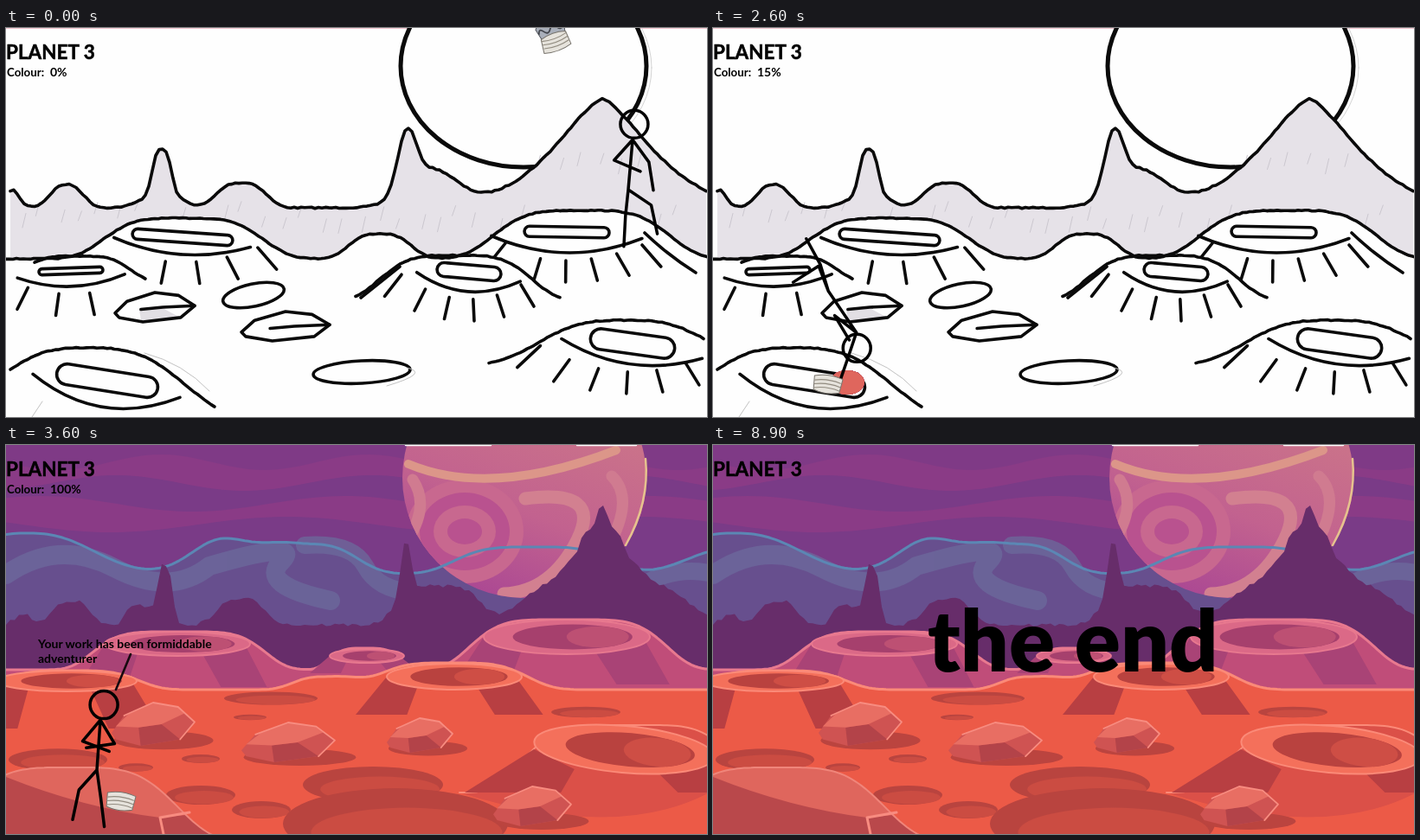
An HTML page that plays this animation: 810x450 px, repeating every 8950 ms.

```html
<!DOCTYPE html>
<html lang="en">
<head>
<meta charset="utf-8">
<title>Planet 3</title>
<style>
  html, body { margin: 0; width: 100%; height: 100%; overflow: hidden; background: #fff; }
  svg { display: block; width: 810px; height: 450px; }
  text { font-family: Lato, "Open Sans", sans-serif; font-weight: 700; font-size: 14px; white-space: pre; }
</style>
</head>
<body>
<svg id="stage" viewBox="0 0 810 450"></svg>
<script>
const LOOP = 8950, STEP = 50, INK = '#0a0a0a';

// ---------- drawing helpers ----------
let seed = 7;
const random = () => (seed = seed * 16807 % 2147483647) / 2147483647;
const jitter = size => (random() - .5) * size;
const range = (n, make) => Array.from({ length: n }, (_, i) => make(i)).join('');

const path = (d, fill, stroke = 'none', w = 0) =>
  `<path d="${d}" fill="${fill}" stroke="${stroke}" stroke-width="${w}"/>`;
const line = (d, color = INK, w = 3.6) => path(d, 'none', color, w);
const land = (d, color) => path(d + 'V450H0Z', color);
const oval = (x, y, rx, ry, fill, stroke = 'none', w = 0) =>
  `<ellipse cx="${x}" cy="${y}" rx="${rx}" ry="${ry}" fill="${fill}" stroke="${stroke}" stroke-width="${w}"/>`;
const turned = (angle, x, y, content) => `<g transform="rotate(${angle} ${x} ${y})">${content}</g>`;

// Skyline: a base height with bumps of [centre, height, width, steepness]
function profile(base, bumps, { from = 0, to = 810, rough = 0, step = 4 } = {}) {
  const points = [];
  for (let x = from; x <= to + step / 2; x += step) {
    const rise = bumps.reduce((sum, [c, h, w, p]) => sum + h * Math.exp(-((Math.abs(x - c) / w) ** p)), 0);
    points.push(`${x} ${(base - rise + jitter(rough)).toFixed(1)}`);
  }
  return 'M' + points.join('L');
}

// Every rock is one outline scaled to its place
const scaled = (shape, x, y, rx, ry) =>
  'M' + shape.map(([u, v]) => `${x + u * rx} ${y + v * ry}`).join('L');
const ROCK = [[-1, .4], [-.7, -.4], [0, -1], [.6, -.8], [1, -.1], [.65, .7], [-.3, 1], [-.9, .7]];
const ROCK_TOP = [[-.9, .1], [-.6, -.45], [0, -1], [.6, -.8], [.75, -.5], [.2, 0], [-.35, .15]];
const ROCK_FRONT = [[-.35, .15], [.2, 0], [.65, .7], [-.3, 1]];

// ---------- pencil drawing ----------
function sketchCrater({ x, y, rx, ry, tilt, rim, dip, marks = 0, left = 0, right = 0 }) {
  const top = y + 6;
  const mark = i => {
    const u = left + (right - left) * i / (marks - 1);
    const sx = x + u * rim, sy = top + dip * (1 - u * u) + 9;
    return line(`M${sx} ${sy}q${u * rim * .12} 12 ${u * rim * .25} 25`);
  };
  return turned(tilt, x, y,
    `<rect x="${x - rx}" y="${y - ry}" width="${rx * 2}" height="${ry * 2}" rx="${ry}" fill="none" stroke="${INK}" stroke-width="3.6"/>`
    + line(`M${x - rim} ${top}Q${x} ${top + dip * 2} ${x + rim} ${top}`)) + range(marks, mark);
}

function sketch() {
  const ridge = profile(208, [[8, 22, 10, 1.5], [70, 27, 24, 2.5], [180, 48, 13, 3], [180, 20, 28, 2], [272, 29, 34, 3],
    [463, 66, 15, 2], [492, 42, 40, 2], [689, 126, 80, 1.5]], { from: 5, rough: 1.5 });
  const ground = profile(267, [[205, 47, 100, 4], [432, 29, 42, 3], [665, 56, 110, 4]], { rough: 1 });
  const stroke = i => {
    const x = 20 + i * 23 + jitter(14), y = (x > 610 && x < 740 ? 150 : 212) + jitter(24);
    return `M${x} ${y}l-4 ${14 + jitter(8)}`;
  };
  const mound = (base, bump, from, to) => line(profile(base, [bump], { from, to, rough: 1 }));
  return `<rect width="810" height="450" fill="#fefefe"/><rect width="810" height="1" fill="#f4c6d0"/>`
    + oval(603, 46, 143, 117, 'none', '#d4d4d4', 1) + oval(598, 44, 142, 117, '#fefefe', INK, 5)
    + path(ridge + 'V275H5Z', '#e6e2e8') + line(range(34, stroke), '#cbc7cf', 1)
    + land(ground, '#fefefe') + line(ridge) + line(ground)
    + mound(295, [82, 31, 68, 4], 33, 161) + mound(316, [520, 53, 95, 4], 404, 638)
    + mound(392, [715, 54, 115, 3], 558, 806) + mound(460, [95, 90, 130, 3], 5, 241)
    + line('M738 237Q765 263 797 283M577 249L565 264M455 276L410 312')
    + [
      { x: 204, y: 242, rx: 58, ry: 6, tilt: 4, rim: 79, dip: 14, marks: 4, left: -.25, right: 1.1 },
      { x: 648, y: 236, rx: 49, ry: 6, tilt: 1, rim: 87, dip: 18, marks: 5, left: -.35, right: 1 },
      { x: 535, y: 282, rx: 37, ry: 8, tilt: 5, rim: 60, dip: 17, marks: 6, left: -1.3, right: 1 },
      { x: 75, y: 281, rx: 37, ry: 3.5, tilt: -2, rim: 62, dip: 12, marks: 3, left: -.8, right: .35 },
      { x: 724, y: 365, rx: 49, ry: 12, tilt: 8, rim: 82, dip: 18, marks: 6, left: -1.3, right: .75 },
      { x: 117, y: 408, rx: 59, ry: 12, tilt: 9, rim: 86, dip: 25 }
    ].map(sketchCrater).join('')
    + path(scaled(ROCK_FRONT, 170, 323, 46, 16), '#e2dfe4')
    + [[172, 323, 46, 17], [323, 345, 51, 17]].map(at =>
      line(scaled(ROCK, ...at) + 'Z') + line(scaled(ROCK_FRONT.slice(0, 2).concat([ROCK[4]]), ...at))).join('')
    + turned(-12, 286, 309, oval(286, 309, 36, 13, 'none', INK, 3.6))
    + turned(-3, 411, 398, oval(411, 398, 56, 13, 'none', INK, 3.6))
    + line('M463 393q28 6-23 21M42 432L30 450M160 376Q205 388 235 420', '#c2c2c2', 1);
}

// ---------- painted landscape ----------
const FAR = { face: '#a94376', rim: '#db6987', edge: '#e8798f', hole: '#a6406d', floor: '#bd5073' };
const NEAR = { face: '#b83f42', rim: '#f4705b', edge: '#fb8a78', hole: '#b9423f', floor: '#ce4e45' };

// Rim ellipse at x, y; the slopes run out to x ± spread at the foot
function crater({ x, y, rx, ry, spread, foot, tilt = 0 }, tone) {
  const slope = `M${x - rx} ${y}L${x - rx * .55} ${y + ry * .85}L${x - rx * .7} ${foot}H${x - spread}Z`
    + `M${x + rx * .35} ${y + ry * .9}L${x + rx * .95} ${y + ry * .3}L${x + spread * .9} ${foot}H${x + rx * .6}Z`;
  const hx = x + rx * .07, hrx = rx * .72, hry = ry * .72;
  return path(slope, tone.face)
    + turned(tilt, x, y, oval(x, y, rx, ry, tone.rim, tone.edge, 2) + oval(hx, y, hrx, hry, tone.hole)
      + oval(hx + hrx * .42, y, hrx * .52, hry * .85, tone.floor));
}

const rock = at => {
  const [x, y, rx, ry] = at;
  return oval(x + rx * .25, y + ry * .75, rx * 1.2, ry * .42, '#bb443f')
    + path(scaled(ROCK, ...at) + 'Z', '#cf5352') + path(scaled(ROCK_FRONT, ...at) + 'Z', '#b34349')
    + path(scaled(ROCK_TOP, ...at) + 'Z', '#e86e63') + line(scaled(ROCK.slice(1, 6), ...at), '#f88c80', 1.8);
};

// Hollows flatten with distance
const pit = ([x, y, rx]) => {
  const ry = rx * (y - 180) / 820;
  return oval(x, y, rx, ry, '#b9443f') + oval(x + rx * .1, y + ry * .25, rx * .85, ry * .7, '#cb4c42');
};

function skyBand(i) {
  let d = `M0 ${20 + i * 24}`;
  for (let x = 0; x <= 810; x += 10) d += `L${x} ${20 + i * 24 + 9 * Math.sin(x / (38 + i * 9) + i * 2)}`;
  return land(d, i % 2 ? '#7a3b87' : '#8a3b86');
}

function painting() {
  const mist = profile(149, [[25, 47, 95, 2.5], [250, 40, 50, 2], [350, 34, 65, 3], [610, 31, 100, 4], [830, 28, 60, 2]]);
  const mountains = profile(208, [[20, 12, 14, 2], [75, 28, 26, 3], [165, 22, 30, 6], [184, 48, 10, 4], [272, 30, 34, 3],
    [500, 45, 55, 4], [462, 62, 8, 2], [690, 55, 105, 4], [688, 25, 48, 6], [688, 30, 27, 8], [689, 29, 8, 2.5]],
    { rough: 4, step: 5 });
  const far = profile(260, [[200, 44, 105, 5], [415, 25, 45, 4], [650, 58, 120, 5]]);
  const near = profile(283, [[75, 22, 85, 4], [370, 15, 45, 3], [515, 31, 95, 4]]);
  const slope = profile(402, [[720, 78, 130, 5]], { from: 524, to: 850 });
  const boulder = profile(460, [[75, 87, 133, 4]], { to: 244 });
  return `<rect width="810" height="450" fill="#7f3a86"/>` + range(4, skyBand)
    + land(mist, '#674f8e')
    + `<g opacity=".75">` + line('M0 150Q60 108 125 142T235 140Q345 108 318 135T375 180', '#6c6a9c', 22)
    + line('M345 116Q400 112 415 140T470 170M730 165Q770 140 812 148', '#6c6a9c', 20) + '</g>'
    + oval(599, 38, 141, 139, 'url(#moon)') + `<g clip-path="url(#disc)" fill="none">`
    + range(4, i => oval(530, 100, 68 - i * 16, 60 - i * 15, i % 2 ? '#b9528f' : '#c8688f'))
    + line('M465 22Q560 62 705 6', '#dc9689', 10) + line('M600 62Q690 50 660 110T575 172', '#d28090', 15)
    + line('M470 40Q490 70 464 110M700 36Q725 60 700 110', '#d07b90', 13) + '</g>'
    + line('M739 16Q744 66 716 116', '#e6c28e', 2.5) + line('M462 0H560M660 0H728', '#fff', 2.5)
    + line(mist, '#5b87b4', 3)
    + land(mountains, '#672d6a')
    + land(far, '#c04d79') + line(far, FAR.edge, 3)
    + [
      { x: 198, y: 230, rx: 84, ry: 14, spread: 115, foot: 280 },
      { x: 417, y: 244, rx: 43, ry: 8, spread: 66, foot: 264 },
      { x: 648, y: 222, rx: 96, ry: 20, spread: 132, foot: 277 }
    ].map(c => crater(c, FAR)).join('')
    + land(near, '#ec5a47') + line(near, NEAR.edge, 3)
    + [
      { x: 70, y: 273, rx: 81, ry: 12, spread: 120, foot: 328 },
      { x: 518, y: 268, rx: 78, ry: 15, spread: 114, foot: 312 }
    ].map(c => crater(c, NEAR)).join('')
    + [[306, 293, 54], [282, 315, 19], [60, 364, 57], [150, 373, 20], [225, 363, 22], [225, 405, 40],
      [295, 422, 34], [424, 393, 81], [450, 438, 130], [670, 309, 40]].map(pit).join('')
    + path(slope + 'Q740 470 524 402Z', '#db5048') + line(slope, NEAR.edge, 2)
    + crater({ x: 714, y: 352, rx: 104, ry: 27, spread: 184, foot: 402, tilt: 5 }, NEAR)
    + [[170, 323, 48, 25], [326, 344, 54, 23], [478, 336, 38, 20], [608, 418, 45, 23]].map(rock).join('')
    + land(boulder, '#b9484b') + path(boulder.split('L').slice(0, 53).join('L') + 'L178 431Q90 420 0 384Z', '#df665d')
    + line(boulder, '#f0857a', 2) + line('M212 425L178 431L182 450', '#f88c80', 3);
}

// ---------- actors ----------
const gauntlet = `
  <g id="fist" stroke="#55585f">
    <path d="M-14-8H14L17 6 12 12H-13L-17 4Z" fill="#a9afba"/>
    ${range(4, i => path(`M${i * 7 - 13} 8l1 ${12 + i % 2 * 3} 4 1 1-13z`, '#c2c5cb', '#55585f', 1))}
    ${line('M-15 1q4-6 8 0t8 0 8 0 6-1', '#43464d', 1.8)}
  </g>
  ${path('M-16-23Q0-28 17-23L15-7Q0-2-15-7Z', '#e6e3dc', '#77736c', 1)}
  ${range(3, i => line(`M-15 ${i * 4.5 - 18}q15-4 30 0`, '#928c80', 1.1))}`;

// Hip x, y, then angles: spine, head, two arms, two legs (upper and lower)
const stand = [719, 187, -85, -84, 132, 23, 54, 81, 96, 93, 34, 78];
const leap = [712, 165, -109, -58, 233, 235, 38, -28, 116, 79, 30, 69];
const dive = [170, 109, 99, 135, 92, 92, 253, 30, 282, 161, 304, 301];
const lean = [110, 368, -73, -52, 158, 160, 114, 147, 150, 107, 101, 63];
const rest = [105, 376, -86, -77, 130, 21, 59, 172, 132, 102, 82, 83];
const shift = ([x, y, ...angles], dx, dy) => [x + dx, y + dy, ...angles];

// time, pose, easing power on the way there
const keys = [
  [0, stand, 1], [300, leap, 1], [500, leap, 1], [1000, shift(leap, 8, -235), 1.6],
  [1001, shift(dive, 25, -290), 1], [1250, shift(dive, 25, -290), 1], [1950, dive, 1],
  [2150, shift(dive, -5, 68), 1], [2450, shift(dive, -29, 174), 1],
  [3050, lean, 1], [3600, rest, 1], [LOOP, rest, 1]
];

document.getElementById('stage').innerHTML = `
  <defs>
    <linearGradient id="moon" x1=".7" y1=".1" x2=".35" y2="1"><stop stop-color="#cd7888"/>
      <stop offset=".6" stop-color="#c2628f"/><stop offset="1" stop-color="#ab4893"/></linearGradient>
    <clipPath id="disc"><ellipse cx="599" cy="38" rx="141" ry="139"/></clipPath>
    <clipPath id="spread"><ellipse id="wave" cx="155" cy="410"/></clipPath>
  </defs>
  <g stroke-linecap="round" stroke-linejoin="round">
    <g>${sketch()}</g>
    <g clip-path="url(#spread)">${painting()}</g>
    <g id="actors" fill="none" stroke="#000" stroke-width="3.5">
      <path id="body"/><circle id="head" r="16"/>
      <g id="gauntlet" stroke-width="1">${gauntlet}</g>
    </g>
    <path id="pointer" d="M144 242L127 283" stroke="#170a10" stroke-width="2.6"/>
  </g>
  <text x="0" y="36" style="font-size:22.5px" stroke="#000" stroke-width=".5">PLANET 3</text>
  <g id="label"><text x="1" y="55.5" style="font-size:13.3px">Colour:</text><text id="percent" x="51" y="55.5"></text></g>
  <text id="speech1" x="37" y="235">Your work has been formiddable<tspan x="37" dy="17">adventurer</tspan></text>
  <text id="speech2" x="96" y="241">Never stop\u00a0 coding</text>
  <text id="ending" x="248" y="262" style="font-size:98.5px;font-weight:900">the end</text>`;

const el = {};
document.querySelectorAll('#stage [id]').forEach(node => el[node.id] = node);
const show = (id, on) => el[id].setAttribute('display', on ? 'inline' : 'none');
const mix = (a, b, k) => a.map((v, i) => v + (b[i] - v) * k);
const along = ([x, y], angle, length) =>
  [x + Math.cos(angle * Math.PI / 180) * length, y + Math.sin(angle * Math.PI / 180) * length];

function poseAt(t) {
  const next = keys.findIndex(k => k[0] > t);
  const [a, b] = [keys[next - 1], keys[next]];
  return mix(a[1], b[1], ((t - a[0]) / (b[0] - a[0])) ** b[2]);
}

function drawFigure(pose) {
  const [x, y, spine, face, ...limbs] = pose;
  const hip = [x, y], neck = along(hip, spine, 58), head = along(neck, face, 18);
  const limb = (from, i, upper, lower) => {
    const joint = along(from, limbs[i], upper);
    return [from, joint, along(joint, limbs[i + 1], lower)];
  };
  const arm = limb(neck, 0, 32, 33);
  const parts = [[hip, neck], arm, limb(neck, 2, 32, 33), limb(hip, 4, 31, 35), limb(hip, 6, 32, 34)];
  el.body.setAttribute('d', parts.map(p => 'M' + p.join('L')).join(''));
  el.head.setAttribute('cx', head[0]);
  el.head.setAttribute('cy', head[1]);
  return [...along(arm[2], limbs[1], 22), limbs[1] - 90];
}

// The glove drops, is caught and worn, then stays in the ground
function placeGauntlet(t, worn) {
  const [x, y, angle] = t < 300 ? mix([630, 2, 160], [642, 39, 145], t / 300) : t < 2450 ? worn : [130, 427, 8];
  el.gauntlet.setAttribute('transform', `translate(${x} ${y}) rotate(${angle})`);
  show('fist', t < 2450);
}

function render(time) {
  const t = Math.floor(time / STEP) * STEP;
  placeGauntlet(t, drawFigure(poseAt(t)));

  const percent = Math.max(0, Math.min(100, (t - 2450) / 10));
  const size = (percent / 60) ** 2;
  el.wave.setAttribute('rx', 316 * size);
  el.wave.setAttribute('ry', 225 * size);
  el.percent.textContent = percent + '%';

  const over = t >= 8900;
  show('actors', !over && (t < 1000 || t >= 1300));
  show('label', !over);
  show('pointer', t >= 3600 && t < 7400);
  show('speech1', t >= 3600 && t < 6650);
  show('speech2', t >= 6650 && t < 7400);
  show('ending', over);
}

const start = performance.now();
function tick() {
  render((performance.now() - start) % LOOP);
  requestAnimationFrame(tick);
}
tick();
</script>
</body>
</html>
```
